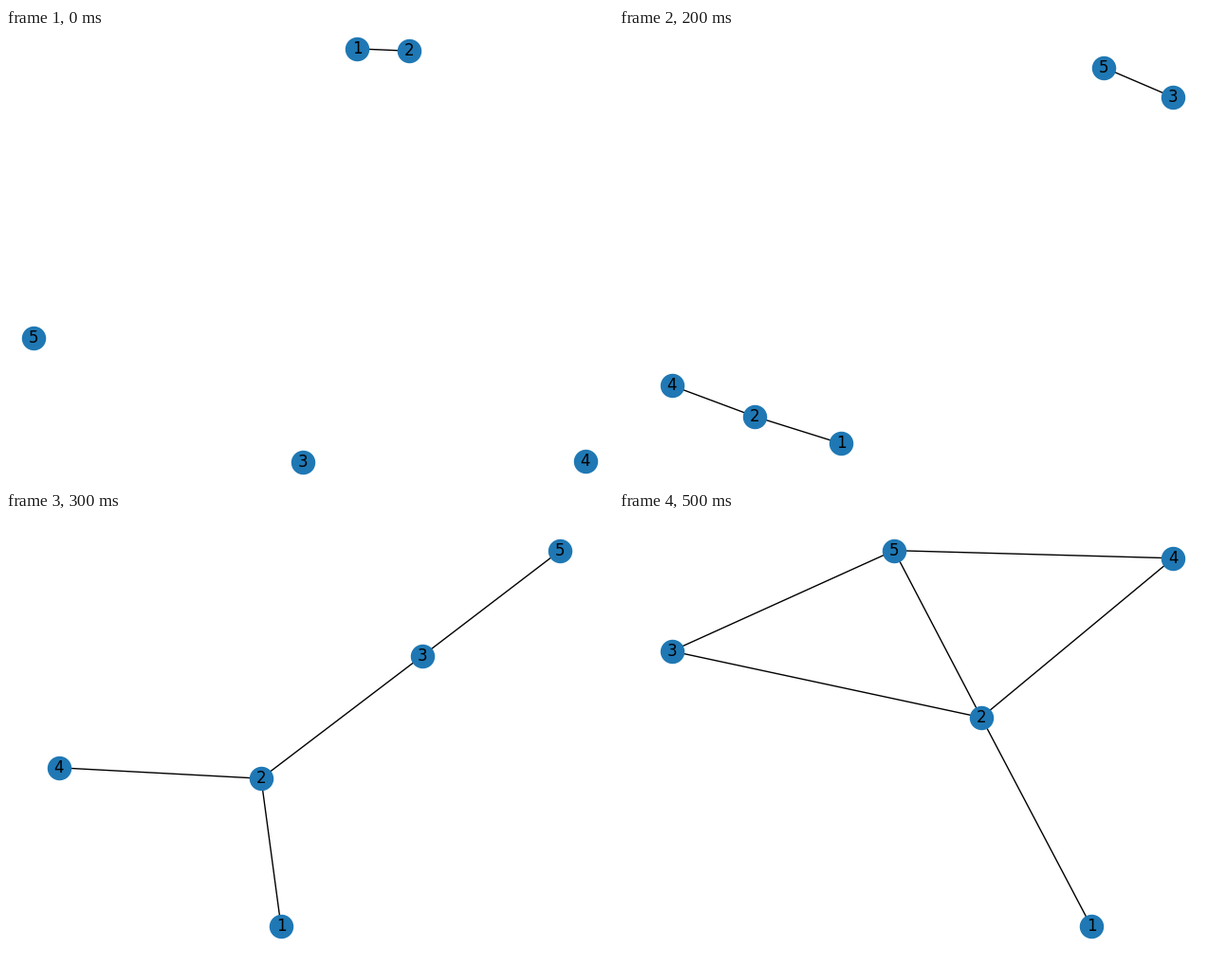
Write a matplotlib script that moves like this. It is 640x480 px and loops after 600 ms.

```python
import matplotlib.pyplot as plt
from matplotlib.animation import FuncAnimation
from matplotlib.collections import LineCollection

WIDTH, HEIGHT, DPI = 640, 480, 100

# One more edge joins the graph at every step, and the layout is redone.
EDGES = [(1, 2), (2, 4), (3, 5), (2, 3), (4, 5), (2, 5)]

# Axis margins fix the outermost node positions (y runs downwards).
LEFT, RIGHT, TOP, BOTTOM = 55.54, 584.46, 41.65, 438.35

# Positions of nodes 1 to 5 for each step.
LAYOUTS = [
    [(370.3, 21.9), (425, 24.2), (313, 458.18), (610.91, 456.8), (29.09, 326.8)],
    [(155, 25.1), (107, 70.2), (610.91, 271.2), (35.1, 91.2), (279, 458.18)],
    [(234, BOTTOM), (143, 409.8), (RIGHT, 73.1), (LEFT, 377.2), (511, TOP)],
    [(290, BOTTOM), (269, 282.2), (439, 152.8), (LEFT, 270.8), (RIGHT, TOP)],
    [(444, BOTTOM), (375.7, 279.8), (LEFT, 162.2), (RIGHT, 139.2), (273, TOP)],
    [(498, BOTTOM), (382, 217.8), (LEFT, 147.8), (RIGHT, 49.8), (290, TOP)],
]

fig = plt.figure(figsize=(WIDTH / DPI, HEIGHT / DPI), dpi=DPI, facecolor="white")
ax = fig.add_axes((0, 0, 1, 1))
ax.set(xlim=(0, WIDTH), ylim=(HEIGHT, 0))
ax.axis("off")

lines = ax.add_collection(
    LineCollection([], colors="black", linewidths=1, zorder=1), autolim=False)
nodes = ax.scatter(*zip(*LAYOUTS[0]), s=300, c="#1f78b4", zorder=2)
labels = [ax.text(0, 0, str(n), fontsize=12, family="DejaVu Sans",
                  ha="center", va="center", zorder=3) for n in range(1, 6)]


def draw(step):
    points = LAYOUTS[step]
    lines.set_segments([(points[a - 1], points[b - 1])
                        for a, b in EDGES[:step + 1]])
    nodes.set_offsets(points)
    for label, point in zip(labels, points):
        label.set_position(point)
    return [lines, nodes, *labels]


anim = FuncAnimation(fig, draw, frames=len(LAYOUTS), interval=100, repeat=True)
plt.show()
```
